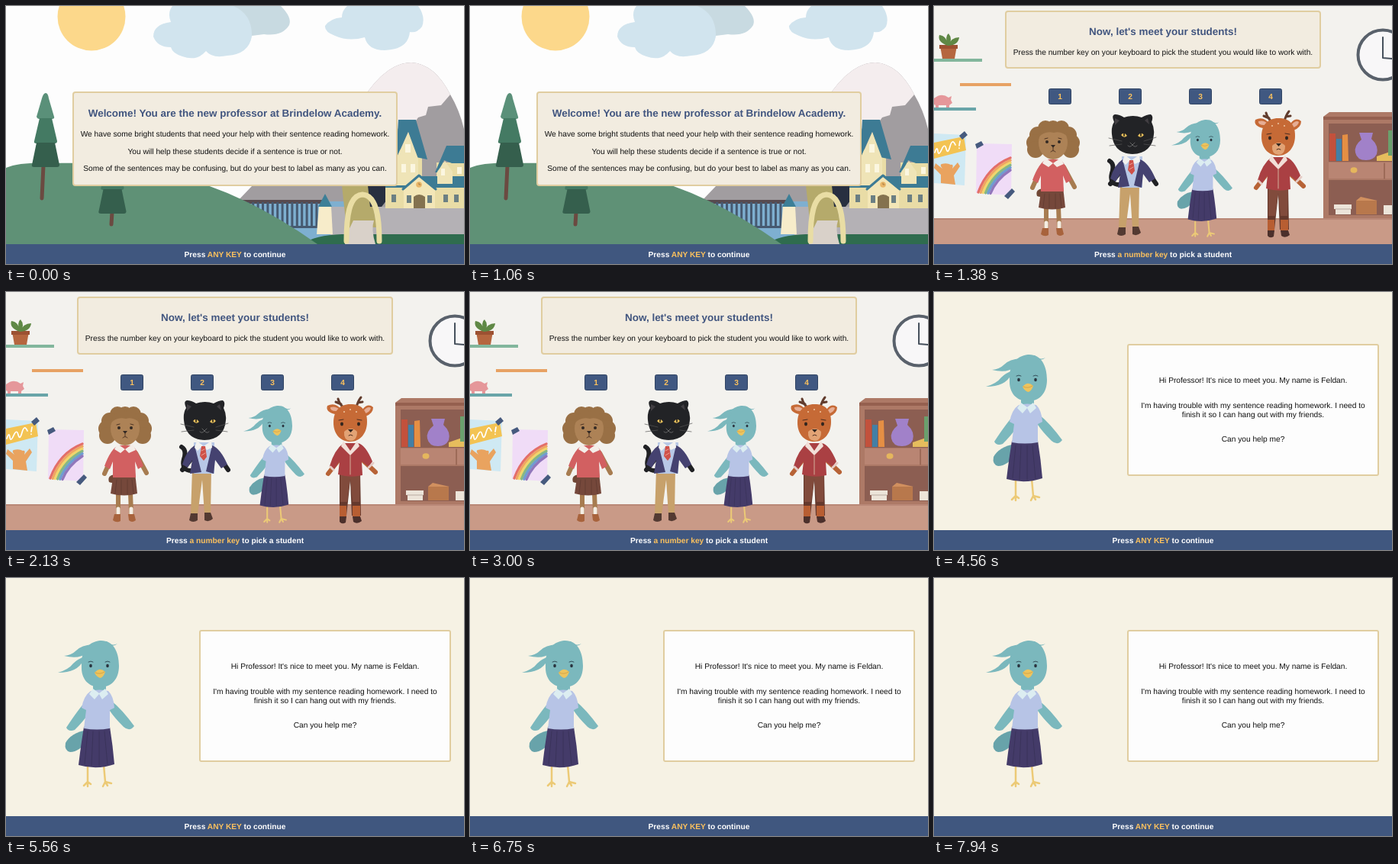
An HTML page for the animation above (8000 ms loop, 600 by 338 pixels).

```html
<!DOCTYPE html>
<html lang="en">
<head>
<meta charset="utf-8">
<title>Welcome, Professor</title>
<style>
html, body { margin: 0; width: 100%; height: 100%; overflow: hidden; background: #fdfdfd; }
svg { display: block; width: 100vw; height: 100vh; }
text { font: 10.2px "Liberation Sans", Arial, sans-serif; text-anchor: middle; fill: #111; text-rendering: geometricPrecision; }
.title { font-size: 13.45px; font-weight: bold; fill: #41557f; }
.bar { font-weight: bold; fill: #fff; }
.key { fill: #fbc15e; font-weight: bold; }
.panel { fill: #f2ece0; stroke: #e0cda0; stroke-width: 2; }
.line { fill: none; stroke-linecap: round; stroke-linejoin: round; }
</style>
</head>
<body>
<svg viewBox="0 0 600 338" preserveAspectRatio="none">
<defs>
  <g id="tree">
    <path fill="#5a9079" d="M0 0Q-3 0-5 7L-12 31Q-11 34-8 34H8Q12 34 11 31L4 7Q3 0 0 0Z"/>
    <path fill="#447a63" d="M-8 33H8L15 63Q15 66 12 66H-12Q-16 66-15 63Z"/>
    <path fill="#355f4d" d="M-12 65H12L18 94Q18 97 15 97H-15Q-19 97-18 94Z"/>
  </g>
  <g id="bird">
    <path fill="#68a3aa" d="M106 199Q85 203 78 216Q76 226 84 228Q96 228 110 210Z"/>
    <path class="line" stroke="#ecca76" stroke-width="2.5" d="M107 245V267L102 272M107 266V273M107 267L111 270M128 245L130 267L127 273M130 267L133 272M130 267L138 269"/>
    <path fill="#7bb8bd" d="M106 160Q96 170 79 196Q82 202 90 199Q101 188 108 178ZM137 160Q152 172 168 194Q162 202 154 195Q142 183 136 174ZM114 136H131V152H114Z"/>
    <path fill="#443b69" d="M102 195H136Q140 220 142 244Q119 252 95 245Q98 219 102 195Z"/>
    <path class="line" stroke="#383157" stroke-width=".8" d="M107 201L103 244M114 201L112 246M122 201V246M129 201L133 245"/>
    <path fill="#b7c4e6" d="M111 148Q122 145 134 148Q141 155 142 170L136 173V197Q119 200 102 197L105 173L99 170Q102 154 111 148Z"/>
    <path fill="#dcedf1" d="M114 145L122 151 130 145 134 152 126 159 122 152 116 159 109 152Z"/>
    <path fill="#7bb8bd" d="M123 82C140 81 148 96 148 115C148 133 138 143 123 143C108 143 98 132 99 115C98 96 107 84 123 82Z"/>
    <path fill="#7bb8bd" d="M124 83Q139 93 146 86Q139 90 132 83ZM106 98Q96 107 76 102Q86 101 92 95Q99 88 113 87ZM101 108Q94 124 68 124Q82 120 88 112Q94 106 103 103Z"/>
    <path fill="#edc45e" d="M116 124Q123 116 130 123Q127 131 123 131Q118 129 116 124Z"/>
    <path class="line" stroke="#cf9d46" stroke-width=".8" d="M117 124Q123 127 129 123"/>
    <path class="line" stroke="#35505a" d="M108 110Q111 108 114 110M130 110Q133 108 136 110"/>
    <g fill="#2a343f"><ellipse cx="111" cy="115" rx="1.8" ry="2.2"/><ellipse cx="133" cy="115" rx="1.8" ry="2.2"/></g>
  </g>
</defs>

<g class="scene">
  <rect width="600" height="338" fill="#fdfdfd"/>
  <circle cx="112" cy="14" r="44.5" fill="#fcd88b"/>
  <path fill="#c8dae1" d="M258 0H360Q375 15 371 25Q362 40 338 37L290 43Z"/>
  <path fill="#d1e4ee" d="M218 0H298Q323 11 322 40Q318 63 290 65Q270 69 262 59Q250 73 231 66Q218 62 216 54Q198 54 193 40Q193 24 216 21Q211 9 218 0Z"/>
  <path fill="#d1e4ee" d="M447 0H540Q550 14 545 27Q538 36 529 34Q527 57 496 58Q474 58 470 41Q449 47 431 39Q417 34 418 26Q425 16 440 15Q440 6 447 0Z"/>

  <path fill="#a19da0" d="M303 256L323 235 420 160 474 112Q502 74 531 74Q562 76 582 116Q594 136 600 161V312H303Z"/>
  <path fill="#f4edee" d="M474 112Q502 74 531 74Q562 76 582 116L570 130 553 132 550 143 540 146 533 156 508 162 470 150Z"/>
  <path fill="#7eafd0" d="M304 256H460V312H304Z"/>
  <g id="railing" fill="#465970"><path fill="#574a4f" d="M303 254H414V259H303Z"/><path d="M345 288H414V291H345Z"/></g>
  <path fill="#b4b1b5" d="M425 263H600V302H425Z"/>
  <path fill="#2f6c4e" d="M388 312Q405 300 440 299H600V312Z"/>
  <path fill="#b5aa6b" d="M440 235H476L486 290H446Z"/><path fill="#282f40" d="M474 235H503V249L492 263H477Z"/>
  <path fill="#f7ecca" d="M410 262H426L428 299H407Z"/><path fill="#3d7f97" d="M418 246L427 263H409Z"/>

  <g id="castle">
    <path fill="#e9dca6" d="M508 188H545V246H508ZM564 205H600V246H564ZM497 231H600V265H497Z"/>
    <path fill="#3d7b94" d="M514 149H537L552 201 537 198 527 165 511 200ZM577 183H600V206H584L574 202 566 218H562ZM497 235L503 223H600V238H497Z"/>
    <path fill="#efe4b7" d="M527 165L512 199V235H540V200ZM575 203L565 217V233H585V217Z"/>
    <path fill="#f3e6b7" d="M541 222L521 241V265H562V241Z"/>
    <path class="line" stroke="#3d7b94" stroke-width="3" d="M520 240L541 222 563 240"/>
    <circle cx="541" cy="234" r="3.8" fill="#e9b668"/>
    <path class="line" stroke="#8a6434" stroke-width=".7" d="M541 232V234H543"/>
    <path fill="#84724f" d="M534 265V250Q541 244 549 250V265Z"/>
    <path fill="#fbf6e0" d="M523 181H530V192H523ZM518 207H524V218H518ZM530 207H536V218H530ZM570 213H575V222H570ZM591 211H597V220H591Z"/>
    <path fill="#6b7f83" d="M505 247H511V257H505ZM525 248H531V258H525ZM552 248H558V258H552ZM573 247H579V257H573ZM587 247H593V257H587Z"/>
  </g>
  <path fill="#d9d1c9" d="M444 312Q447 296 455 281H482Q478 292 484 312Z"/>
  <path class="line" stroke="#e9dda4" stroke-width="7" d="M446 308C446 277 449 248 467 247C486 248 489 279 489 308"/>

  <path fill="#5f9176" d="M0 212Q20 204 62 206C150 204 205 213 264 235Q335 260 408 312H0Z"/>
  <path class="line" stroke="#6b4a41" stroke-width="5" d="M49 209L47 252M139 270L138 286"/>
  <use href="#tree" x="52" y="114"/><use href="#tree" x="139.5" y="175"/>

  <rect class="panel" x="88" y="113" width="424" height="122" rx="3"/>
  <text class="title" x="300" y="145">Welcome! You are the new professor at Brindelow Academy.</text>
  <text x="300" y="171">We have some bright students that need your help with their sentence reading homework.</text>
  <text x="300" y="193.5">You will help these students decide if a sentence is true or not.</text>
  <text x="300" y="216">Some of the sentences may be confusing, but do your best to label as many as you can.</text>
</g>

<g class="scene">
  <rect width="600" height="338" fill="#f3f2ee"/>
  <path fill="#c99a87" d="M0 279H600V312H0Z"/><path fill="#b98877" d="M0 278H600V280H0Z"/>

  <path fill="#82b69c" d="M0 69H63V73H0Z"/><path fill="#e7a264" d="M34 101H101V105H34Z"/><path fill="#69a5a8" d="M0 133H55V137H0Z"/>
  <path fill="#b5663f" d="M8 52H30L27 69H11Z"/><path fill="#9c5132" d="M7 51H31V56H7Z"/>
  <path fill="#5f8845" d="M18 52Q4 47 7 38Q17 39 18 52Q14 39 19 36Q25 43 19 52Q22 41 33 41Q32 51 19 52Z"/>
  <path fill="#e5979a" d="M0 121Q10 113 19 120L23 118 22 123 24 127 20 130V133H16V130H6V133H2V130L0 129Z"/>

  <g>
    <path fill="#cfe9f3" d="M0 167L42 169 40 235 0 232Z"/>
    <path fill="#f3c353" d="M0 179L39 171 42 189 0 200Z"/>
    <path class="line" stroke="#fff" stroke-width="1.7" d="M1 192Q4 183 5 190T10 188T16 187T21 184T28 182M34 177L33 183M33 186V186.3"/>
    <path fill="#e9a35f" d="M9 232V221L0 212 2 206 11 213Q7 208 10 207Q17 205 22 208Q26 207 24 213L31 205 34 210 26 222 28 234Z"/>
    <path fill="#f0dcf7" d="M56 180L102 181 101 248 55 245Z"/>
    <g id="rainbow" class="line" stroke-width="3.4"></g>
    <path fill="#465a7e" d="M33 170L40 164 44 169 37 175ZM54 181L62 177 65 182 56 187ZM92 249L102 239 106 243 97 253Z"/>
  </g>

  <circle cx="588" cy="64" r="32.5" fill="#f8f7f8" stroke="#59616b" stroke-width="4"/>
  <path class="line" stroke="#46505c" stroke-width="2" d="M588 41V68L600 69"/>

  <path fill="#ad7966" d="M510 145L518 139H600V278H510Z"/><path fill="#95604f" d="M510 145H600V149H510Z"/>
  <path fill="#8c5e52" d="M517 154H600V204H517ZM517 228H600V274H517Z"/>
  <path fill="#b98573" d="M517 205H600V226H517Z"/><ellipse cx="550" cy="215" rx="4.5" ry="3.7" fill="#e5b65d"/>
  <path class="line" stroke="#81503f" d="M590 206V226"/>
  <path fill="#c3513c" d="M518 167H526V203H518Z"/><path fill="#437fa6" d="M527 174H534V203H527Z"/><path fill="#e58f44" d="M535 169L542 168 543 203H535Z"/>
  <path fill="#a181c9" d="M557 166H575L573 174Q583 183 580 194Q576 202 566 202Q554 202 552 192Q550 183 560 175Z"/>
  <path fill="#e6bd5d" d="M580 197L600 190V203H580Z"/><path fill="#6aa06d" d="M595 163H600V196H595Z"/>
  <path fill="#ece4d9" d="M524 260H547V266H524ZM526 266H546V273H526ZM589 261H600V273H589Z"/><path class="line" stroke="#b9aaa0" d="M526 266H546"/>
  <path fill="#b8784c" d="M553 255H580V273H553Z"/><path fill="#d1905f" d="M553 255L559 250 581 255Z"/>

  <g id="dog">
    <path fill="#704735" d="M143 239Q132 240 135 249Q143 252 148 245Z"/>
    <path class="line" stroke="#a77c50" stroke-width="6" d="M141 211L129 238M170 211L184 237M147 263L147 290M163 263L164 290"/>
    <path class="line" stroke="#f4ede3" stroke-width="5" d="M147 284V290M164 284V290"/>
    <path fill="#a8633c" d="M142 291H150V300Q145 303 140 299ZM160 291H168L170 299Q165 303 161 299Z"/>
    <path fill="#75483b" d="M141 237H169L172 264Q155 269 137 264Z"/>
    <path class="line" stroke="#603a30" stroke-width=".8" d="M145 246L143 264M151 246V265M159 246V265M165 246L167 264"/>
    <path fill="#d26061" d="M147 201H165Q172 205 180 228L173 232 169 222 170 243H140L140 222 136 232 129 228Q137 206 147 201Z"/>
    <g id="curls" fill="#997045"></g>
    <ellipse cx="156" cy="179" rx="19" ry="22" fill="#ad8256"/>
    <path fill="#997045" d="M137 172Q141 154 156 157Q171 154 176 172Q167 163 157 166Q145 163 137 172Z"/>
    <path fill="#f4eee9" d="M146 199L156 206 166 199 170 207 161 211 156 206 150 211 142 206Z"/>
    <path fill="#322924" d="M146 178A2 2 0 1 0 150 178A2 2 0 1 0 146 178M162 178A2 2 0 1 0 166 178A2 2 0 1 0 162 178M153 182H159L156 186Z"/>
    <path class="line" stroke="#4e3424" d="M145 174L149 173M163 173L167 174M156 186V189M153 191Q156 188 159 191"/>
  </g>

  <g id="cat">
    <path class="line" stroke="#202124" stroke-width="6" d="M245 234Q229 235 233 219Q237 207 230 203M245 216L231 233M278 214L291 233"/>
    <path fill="#c7a16b" d="M244 232H269L268 291H260L257 246 251 292H242Z"/>
    <path fill="#533a32" d="M242 290H251V299Q245 303 240 299ZM260 289H268L271 297Q266 302 260 299Z"/>
    <path fill="#b8c8e6" d="M246 197H273V238H246Z"/>
    <path fill="#454270" d="M247 201L256 236 241 238 244 220 238 230 231 226Q236 208 247 201ZM270 201Q281 205 290 226L282 231 274 220 272 238 262 235Z"/>
    <path fill="#f3f2ef" d="M250 195L259 202 269 195 270 204 263 207 258 201 251 208 247 204Z"/>
    <path fill="#cf5149" d="M256 202H261L263 216 259 221 254 215Z"/><path class="line" stroke="#efa095" d="M256 208L260 206M256 214L261 211"/>
    <path fill="#222326" d="M233 168Q232 158 236 152Q232 143 237 142Q243 142 249 146Q261 142 272 146Q279 142 284 142Q288 144 285 152Q289 160 288 168Q286 193 260 194Q235 193 233 168Z"/>
    <path fill="#413e42" d="M237 147L243 150 237 156ZM280 147L276 150 282 155Z"/>
    <path fill="#e7bf5c" d="M245 169Q249 164 253 170Q249 174 245 169ZM267 170Q271 164 275 169Q271 174 267 170Z"/>
    <path class="line" stroke="#111" stroke-width="1.5" d="M249 167V170M271 167V170"/>
    <path class="line" stroke="#777" stroke-width=".8" d="M257 179L260 182 263 179M260 182Q257 186 254 183M260 182Q263 186 266 183"/>
    <path class="line" stroke="#555" stroke-width=".7" d="M246 177L229 173M246 181L230 183M275 177L291 172M275 181L290 183"/>
  </g>

  <use href="#bird" transform="translate(256.6 83.4) scale(.8)"/>

  <g id="deer">
    <path class="line" stroke="#613c2d" stroke-width="3" d="M442 151Q437 147 435 140M439 147L432 144M459 151Q461 143 465 138M461 145L467 144"/>
    <path class="line" stroke="#b76336" stroke-width="6" d="M436 220L422 238M466 219L484 236"/>
    <path fill="#65392d" d="M437 236H464L465 293H453L451 246 446 293H437Z"/><path fill="#814b3c" d="M438 236H464L463 275H454L451 245 447 275H438Z"/>
    <path fill="#b85e32" d="M437 280H446V295H437ZM454 280H464V295H454Z"/><path fill="#4c302b" d="M437 294H446L445 302Q440 305 437 301ZM454 294H464L466 300Q460 305 455 301Z"/>
    <path fill="#aa4043" d="M442 198H461Q471 200 480 222L475 229 466 222 467 240Q451 244 435 239L437 222 429 233 424 228Q430 207 442 198Z"/>
    <path class="line" stroke="#e5cbc4" stroke-width="3" d="M425 229L429 233M475 230L481 224"/>
    <path fill="#f2dfd8" d="M442 195L451 208 460 195 463 202 451 214 439 202Z"/>
    <path class="line" stroke="#d3b09c" d="M451 214V239"/>
    <path fill="#c66a36" d="M431 160Q418 157 421 149Q432 144 439 154ZM467 154Q474 145 481 151Q481 159 471 163Z"/>
    <path fill="#e6ad94" d="M433 156Q424 156 425 151Q432 149 437 154ZM468 156Q474 149 478 152Q477 157 471 159Z"/>
    <path fill="#c66a36" d="M451 147C466 147 473 155 473 170C473 185 464 196 451 196C438 196 429 186 429 171C429 156 437 147 451 147Z"/>
    <path fill="#e2a375" d="M443 183Q452 175 460 183Q460 195 451 195Q442 194 443 183Z"/>
    <path fill="#efc8a4" d="M442 157A1 1 0 1 0 444 157A1 1 0 1 0 442 157M450 154A1 1 0 1 0 452 154A1 1 0 1 0 450 154M458 157A1 1 0 1 0 460 157A1 1 0 1 0 458 157"/>
    <path fill="#30251f" d="M438 173A2 2.4 0 1 0 442 173A2 2.4 0 1 0 438 173M460 173A2 2.4 0 1 0 464 173A2 2.4 0 1 0 460 173M448 180H455L451.5 184Z"/>
    <path class="line" stroke="#4a2c20" d="M436 168L442 167M460 167L466 168M449 188Q451.5 186 454 188"/>
  </g>

  <rect class="panel" x="94" y="7" width="412" height="74" rx="3"/>
  <text class="title" x="300" y="38">Now, let's meet your students!</text>
  <text x="300" y="63.5">Press the number key on your keyboard to pick the student you would like to work with.</text>
  <g id="keys"></g>
</g>

<g class="scene">
  <rect width="600" height="338" fill="#f6f2e4"/>
  <use href="#bird"/>
  <rect class="panel" x="254" y="69" width="328" height="171" rx="2" style="fill:#fdfdfd"/>
  <text x="418" y="119">Hi Professor! It's nice to meet you. My name is Feldan.</text>
  <text x="418" y="151.5">I'm having trouble with my sentence reading homework. I need to</text>
  <text x="418" y="163.5">finish it so I can hang out with my friends.</text>
  <text x="418" y="196">Can you help me?</text>
</g>
</svg>

<script>
const LOOP = 8000;
const scenes = [
  { start: 0, key: "ANY KEY", action: "continue" },
  { start: 1250, key: "a number key", action: "pick a student" },
  { start: 4500, key: "ANY KEY", action: "continue" },
];

const append = (target, markup) => target.insertAdjacentHTML("beforeend", markup);
const byId = id => document.getElementById(id);

for (let x = 303; x < 408; x += 6.4) {
  append(byId("railing"), `<rect x="${x}" y="257" width="3" height="33"/>`);
}

["#e36f69", "#efa563", "#f0d66c", "#86b884", "#6f9dd0", "#9177bb"].forEach((color, i) => {
  const d = i * 3.2;
  append(byId("rainbow"), `<path stroke="${color}" d="M${58 + d} ${244 + i * .3}Q${70 + d * .7} ${211 + d} 100 ${199 + d}"/>`);
});

// Curly hair: a crown of puffs with two drooping ears.
const puffs = [[156, 160, 10], [146, 160, 10], [167, 160, 10]];
for (const side of [-1, 1]) {
  puffs.push([156 + side * 20, 169, 11], [156 + side * 24, 179, 11], [156 + side * 23, 188, 11]);
}
for (const [x, y, r] of puffs) append(byId("curls"), `<circle cx="${x}" cy="${y}" r="${r}"/>`);

for (let n = 1; n <= 4; n++) {
  const x = 73 + n * 92;
  append(byId("keys"), `<rect x="${x - 14.5}" y="108.5" width="29" height="20" rx="2" fill="#405881" stroke="#304463"/>
    <text class="key" x="${x}" y="122">${n}</text>`);
}

// Scenes are stacked and opaque: each one covers those before it from its start on.
document.querySelectorAll(".scene").forEach((scene, i) => {
  const { start, key, action } = scenes[i];
  append(scene, `<rect y="312" width="600" height="26" fill="#40577f"/>
    <text class="bar" x="300" y="328.5">Press <tspan class="key">${key}</tspan> to ${action}</text>`);
  if (start === 0) return;
  const offset = start / LOOP;
  scene.animate([
    { opacity: 0, offset: 0 }, { opacity: 0, offset },
    { opacity: 1, offset }, { opacity: 1, offset: 1 },
  ], { duration: LOOP, iterations: Infinity });
});
</script>
</body>
</html>
```
